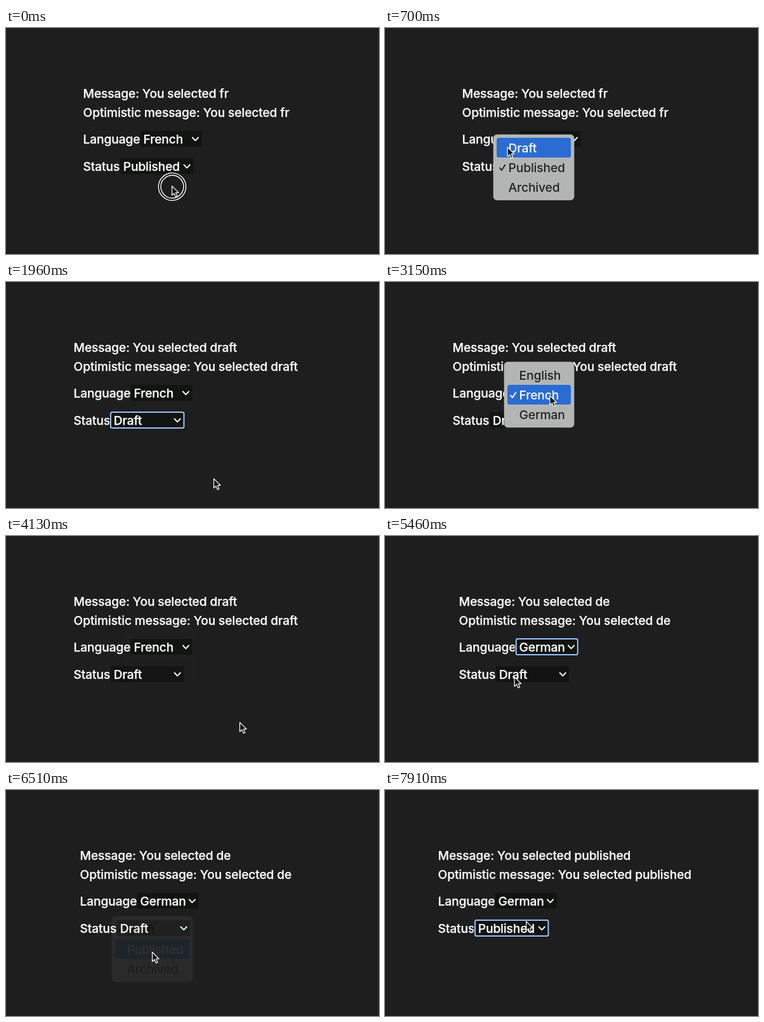
Animation of 588 by 356 pixels, one loop 8 s. Source, as an HTML page:

```html
<!DOCTYPE html>
<html lang="en">
<head>
<meta charset="utf-8">
<title>Optimistic form</title>
<style>
  html, body { margin: 0; width: 100%; height: 100%; overflow: hidden; background: #1e1e1e; }
  svg { display: block; width: 588px; height: 356px; }
  text {
    font: 500 19.2px Inter, "Liberation Sans", sans-serif;
    font-optical-sizing: none;
    letter-spacing: -0.13px;
    fill: #fff;
    white-space: pre;
  }
  .form text { stroke: #fff; stroke-width: .25; }
  .field { fill: #121412; }
  .chevron, .tick { fill: none; stroke: #fff; stroke-width: 1.9; stroke-linecap: round; stroke-linejoin: round; }
  .focus { fill: none; stroke: #9cc3fa; stroke-width: 2; }
  .panel { fill: #b3b5b5; stroke: #bfc1c1; stroke-width: .6; }
  .bar { fill: #2a6cd2; }
  .menu text { fill: #222; }
  .menu .tick { stroke: #222; }
  .menu .on text { fill: #fff; }
  .menu .on .tick { stroke: #fff; }
  .press circle { fill: none; stroke: #fff; stroke-width: 1.4; }
  .press .gap { stroke: #111; stroke-width: 2.6; }
</style>
</head>
<body>
<svg id="stage" viewBox="0 0 588 356"></svg>
<script>
const LOOP = 8000, STEP = 70, ROW = 31;
const stage = document.getElementById('stage');

function add(parent, tag, attrs = {}, text) {
  const el = document.createElementNS('http://www.w3.org/2000/svg', tag);
  set(el, attrs);
  if (text) el.textContent = text;
  parent.append(el);
  return el;
}
function set(el, attrs) {
  for (const key in attrs) el.setAttribute(key, attrs[key]);
}
function show(el, on) {
  el.style.display = on ? '' : 'none';
}
const moveTo = (el, x, y) => el.setAttribute('transform', `translate(${x} ${y})`);

// Form state from time `at`; `done` is when the saved message catches up.
const states = [
  { at: 0, done: 0, left: 122, value: 'fr', language: 'French', status: 'Published' },
  { at: 1400, done: 1960, left: 107, value: 'draft', language: 'French', status: 'Draft', changed: 'status', blur: 2870 },
  { at: 4270, done: 4760, left: 117, value: 'de', language: 'German', status: 'Draft', changed: 'language', blur: 5530 },
  { at: 6650, done: 7140, left: 84, value: 'published', language: 'German', status: 'Published', changed: 'status', blur: LOOP }
];

const statusItems = ['Draft', 'Published', 'Archived'];
const menus = [
  { open: 140, pick: 700, fade: 1047, x: 171, y: 168, w: 127, items: statusItems, ticked: 1 },
  { open: 2940, pick: 3570, fade: 3920, x: 188, y: 126, w: 110, items: ['English', 'French', 'German'], ticked: 1 },
  { open: 5530, pick: 6300, fade: 6315, x: 167, y: 199, w: 127, items: statusItems, ticked: 0 }
];
const FADE = 212;

const inOut = u => u * u * (3 - 2 * u);
const easeIn = u => u * u;
const easeOut = u => u * (2 - u);

// Pointer stops: time, x, y, easing on the way in.
const path = [
  [0, 261, 248], [420, 190, 185], [630, 190, 185],
  [1120, 314, 279, easeIn], [1260, 327, 309, easeOut], [2240, 327, 309],
  [3010, 259, 174], [3080, 259, 174], [3430, 262, 215], [3500, 262, 215],
  [4200, 371, 295], [4970, 371, 295], [5530, 196, 218], [5740, 196, 218],
  [6160, 230, 254.6], [7560, 230, 254.6], [7770, 223, 207], [7840, 223, 207], [7910, 222, 206]
];
const presses = [[0, 140], [420, 700], [2870, 2940], [3430, 3570], [6160, 6300]];

function pointerAt(t) {
  const i = path.findIndex(p => p[0] >= t);
  if (i < 0) return path[path.length - 1].slice(1, 3);
  if (i === 0) return path[0].slice(1, 3);
  const [t0, x0, y0] = path[i - 1];
  const [t1, x1, y1, ease = inOut] = path[i];
  const u = ease((t - t0) / (t1 - t0));
  return [x0 + (x1 - x0) * u, y0 + (y1 - y0) * u];
}

function makeField(parent, label, x, y, w) {
  add(parent, 'text', { x: 0, y }, label);
  const top = y - 20, right = x + w;
  add(parent, 'rect', { class: 'field', x, y: top, width: w, height: 25 });
  const value = add(parent, 'text', { x: x + 4.6, y });
  add(parent, 'path', { class: 'chevron', d: `M${right - 14.6} ${y - 9.5}l4.6 4.8l4.6 -4.8` });
  const ring = add(parent, 'g');
  add(ring, 'rect', { x: x - 2, y: top - 1.5, width: w + 4, height: 28, rx: 4, fill: 'none', stroke: '#171717' });
  add(ring, 'rect', { class: 'focus', x: x - .3, y: top, width: w + .6, height: 25, rx: 2.5 });
  const pending = add(parent, 'text', { x: right + .5, y }, '(submitting...)');
  return { value, ring, pending };
}

const form = add(stage, 'g', { class: 'form' });
const message = add(form, 'text', { x: 0, y: 110 });
const optimistic = add(form, 'text', { x: 0, y: 140 });
const fields = {
  language: makeField(form, 'Language', 90.4, 182, 96.5),
  status: makeField(form, 'Status', 58.6, 225, 115)
};

for (const menu of menus) {
  menu.el = add(stage, 'g', { class: 'menu' });
  moveTo(menu.el, menu.x, menu.y);
  add(menu.el, 'rect', { class: 'panel', width: menu.w, height: 103, rx: 5.5 });
  menu.bar = add(menu.el, 'rect', { class: 'bar', x: 5, width: menu.w - 10, height: ROW, rx: 3.5 });
  menu.rows = menu.items.map((name, i) => {
    const row = add(menu.el, 'g');
    moveTo(row, 0, 5 + i * ROW);
    add(row, 'text', { x: 23.6, y: 23 }, name);
    if (i === menu.ticked) add(row, 'path', { class: 'tick', d: 'M10 16.5l2.8 3.6l5.6 -8.4' });
    return row;
  });
}

const pointer = add(stage, 'g');
const press = add(pointer, 'g', { class: 'press' });
add(press, 'circle', { class: 'gap', cx: 1, cy: 2, r: 19.8 });
add(press, 'circle', { cx: 1, cy: 2, r: 21.6 });
add(press, 'circle', { cx: 1, cy: 2, r: 18 });
add(pointer, 'path', {
  d: 'M.6 .8V15.6L4 12.4L6.4 18L9 16.9L6.6 11.4H11.2Z',
  fill: '#111', stroke: '#fff', 'stroke-width': 1.2, 'stroke-linejoin': 'round'
});

function drawForm(t) {
  const index = states.findLastIndex(s => t >= s.at);
  const state = states[index];
  const waiting = t < state.done;
  const saved = waiting ? states[index - 1] : state;
  moveTo(form, state.left - .4, 0);
  message.textContent = 'Message: You selected ' + saved.value;
  optimistic.textContent = 'Optimistic message: You selected ' + state.value;
  for (const name in fields) {
    const field = fields[name], active = state.changed === name;
    field.value.textContent = state[name];
    show(field.ring, active && t < state.blur);
    show(field.pending, active && waiting);
  }
}

function drawMenu(menu, t) {
  const alpha = Math.min(1, 1 - (t - menu.fade) / FADE);
  const visible = t >= menu.open && alpha > 0;
  show(menu.el, visible);
  if (!visible) return;
  menu.el.style.opacity = alpha;
  const y = pointerAt(Math.min(t, menu.pick - STEP))[1];
  const chosen = Math.max(0, Math.min(2, Math.floor((y - menu.y - 5) / ROW)));
  menu.bar.setAttribute('y', 5 + chosen * ROW);
  menu.rows.forEach((row, i) => row.setAttribute('class', i === chosen ? 'on' : ''));
}

function draw(now) {
  const t = Math.min(7910, Math.floor((now % LOOP) / STEP) * STEP);
  drawForm(t);
  menus.forEach(menu => drawMenu(menu, t));
  moveTo(pointer, ...pointerAt(t));
  show(press, presses.some(([from, to]) => t >= from && t < to));
}

const start = performance.now();
function tick() {
  draw(performance.now() - start);
  requestAnimationFrame(tick);
}
tick();
</script>
</body>
</html>
```
